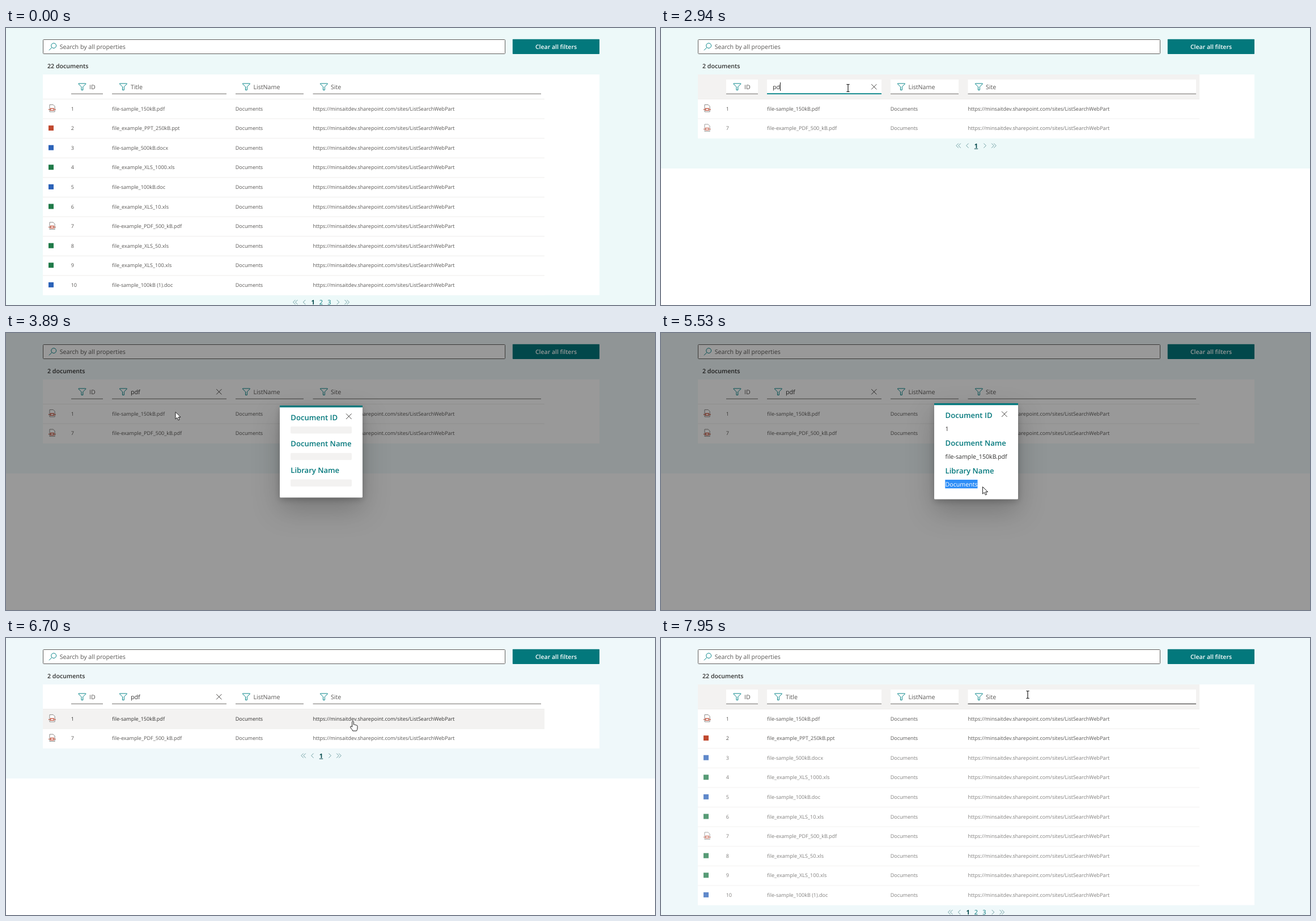
Write an HTML page that moves like this. It is 1145 px wide and 489 px high and loops after 8000 ms.

```html
<!DOCTYPE html>
<html lang="en">
<head>
<meta charset="utf-8">
<title>Document search</title>
<style>
  html, body { margin: 0; width: 100%; height: 100%; overflow: hidden; background: #fff; }
  svg { display: block; width: 1145px; height: 489px; }
  text {
    font: 10.65px "Open Sans", "Noto Sans", sans-serif;
    fill: #585654;
    text-rendering: geometricPrecision;
    white-space: pre;
  }
  .row text { font-size: 9.05px; }
  .row.hover text { fill: #323130; }
  .bold { font-weight: 600; fill: #323130; }
  .head { font-size: 13.1px; font-weight: 600; fill: #03787c; }
  .val { fill: #323130; }
  .line { fill: none; stroke: #038387; stroke-width: 1; }
  .cross { fill: none; stroke: #484644; stroke-width: 1; }
  .rule { fill: #7a7876; }
  .field { fill: #fff; }
  .pages text { font-size: 11px; fill: #03787c; text-anchor: middle; }
  .pages .now { font-weight: 700; fill: #02474a; }
  .pages path { fill: none; stroke: #6f9fa3; stroke-width: 1; }
  #modal { filter: drop-shadow(0 4px 6px rgba(0,0,0,.2)) drop-shadow(0 20px 24px rgba(0,0,0,.22)); }
  #cursor path { stroke-linejoin: round; }
</style>
</head>
<body>
<svg id="stage" viewBox="0 0 1145 489" xmlns="http://www.w3.org/2000/svg">
  <rect id="bg" width="1145" height="489"/>
  <rect x="65.5" y="20.5" width="815" height="25" rx="1" fill="#fff" stroke="#605e5c"/>
  <path class="line" d="M80.9 34.4L75.9 39.4"/><circle class="line" cx="84.2" cy="31.2" r="4.4"/>
  <text x="94.7" y="37">Search by all properties</text>
  <rect id="clear" x="893.8" y="19.8" width="153.2" height="26.2" rx=".8"/>
  <text x="970.5" y="37" text-anchor="middle" style="font-weight:600;font-size:10.5px;fill:#fff">Clear all filters</text>
  <text id="count" class="bold" x="73" y="71"></text>
  <rect id="panel" x="65" y="82" width="982" fill="#fff"/>
  <rect id="header" x="65" y="82" width="885" height="43.5" fill="#f3f2f1"/>
  <g id="fields"></g>
  <g id="rows"></g>
  <g id="pages" class="pages"></g>
  <rect id="shade" width="1145" height="489" fill="#000"/>
  <g id="modal"></g>
  <g id="cursor">
    <path id="arrow" d="M.5 .5V13L3.4 10.3L5.4 14.9L7.6 14L5.6 9.5H9.6Z" fill="#fff" stroke="#222"/>
    <path id="beam" d="M-2.7-6.5H-.8L0-5.8L.8-6.5H2.7M0-5.8V5.8M-2.7 6.5H-.8L0 5.8L.8 6.5H2.7" fill="none" stroke="#222" stroke-width="1.2"/>
    <path id="hand" d="M-1.3 10V.8Q0-1.2 1.3 .8V6Q2.8 5 3.8 6.5Q5.3 5.7 6 7.2Q7.8 6.6 8 8.5V12Q8 14.5 6.5 17H-.3Q-1 14.5-3.6 12Q-5 9.8-4 9Q-2.8 8.4-1.3 10Z" fill="#fff" stroke="#222"/>
  </g>
</svg>
<script>
const LOOP = 8000, STEP = 34.6, TOP = 125.5;
const $ = id => document.getElementById(id);
const set = (el, attrs) => { for (const k in attrs) el.setAttribute(k, attrs[k]); };
const show = (el, on) => { el.style.display = on ? '' : 'none'; };
const clamp = v => Math.max(0, Math.min(1, v));
const inside = (p, x1, y1, x2, y2) => p.x >= x1 && p.x < x2 && p.y >= y1 && p.y < y2;

const text = (x, y, s, cls = '', id = '') => `<text x="${x}" y="${y}" class="${cls}" id="${id}">${s}</text>`;
const cross = (x, y, r) => `<path class="cross" d="M${x - r} ${y - r}l${2 * r} ${2 * r}m0 ${-2 * r}l${-2 * r} ${2 * r}"/>`;
const funnel = x => `<path class="line" d="M${x} 98h12.8v.8l-5 5v5.7h-2.8v-5.7l-5-5z"/>`;

// Column filters: left, right, icon x, label x, label
const columns = [
  [115, 171, 128, 147, 'ID'],
  [187, 389, 200.5, 220, 'Title'],
  [405, 525, 417.5, 436.5, 'ListName'],
  [541.5, 944, 554.5, 573, 'Site']
];
$('fields').innerHTML = columns.map(([l, r, ix, tx, name], i) =>
  `<rect class="field" x="${l}" y="91" width="${r - l}" height="25"/>
   <rect class="rule" id="rule${i}" x="${l}" y="115.7" width="${r - l}" height="1.1"/>
   <g id="funnel${i}">${funnel(ix)}</g>${text(tx, 108, name, '', 'label' + i)}`).join('') +
  `<g id="wipe">${cross(375.8, 103.8, 4.6)}</g>
   <rect id="caret" y="96" width="1" height="15" fill="#222"/>`;

const files = [
  'file-sample_150kB.pdf', 'file_example_PPT_250kB.ppt', 'file-sample_500kB.docx',
  'file_example_XLS_1000.xls', 'file-sample_100kB.doc', 'file_example_XLS_10.xls',
  'file-example_PDF_500_kB.pdf', 'file_example_XLS_50.xls', 'file_example_XLS_100.xls',
  'file-sample_100kB (1).doc'
];
const tints = { ppt: '#c0492f', doc: '#2b62b8', docx: '#2b62b8', xls: '#1f7a48' };
const sheet = `<path d="M77 9.9h6.2l2.9 2.9v9.6h-9.1z" fill="#fff" stroke="#8a8886"/>
  <path d="M75 18.4h2.2m8.4 0h2.2M78.6 16.6h5.6v3.4h-5.6z" fill="none" stroke="#c2472f" stroke-width="1.2"/>`;
const icon = ext => ext === 'pdf' ? sheet :
  `<rect x="75" y="12" width="9" height="9" fill="${tints[ext]}"/>`;
const link = 'https://minsaitdev.sharepoint.com/sites/ListSearchWebPart';

$('rows').innerHTML = files.map((name, i) =>
  `<g class="row"><rect class="fill" x="65" width="885" height="${STEP}" fill="#fff"/>
   <rect x="65" y="-.5" width="885" height="1" fill="#eeedec"/>
   ${icon(name.split('.').pop())}
   ${text(114.7, 20.2, i + 1)}${text(187.3, 20.2, name)}${text(404.7, 20.2, 'Documents')}${text(541.5, 20.2, link)}</g>`).join('');
const rows = [...document.querySelectorAll('.row')];

const chevron = (x, y, dir) => `<path d="M${x + 2 * dir} ${y - 4}L${x - 2 * dir} ${y}L${x + 2 * dir} ${y + 4}"/>`;
function pager(n, y) {
  const half = 14.3 * (n - 1) / 2;
  let out = '';
  for (const dir of [1, -1]) {
    const at = d => 556 - dir * (half + d);
    out += chevron(at(15.4), y, dir) + chevron(at(29.2), y, dir) + chevron(at(33.2), y, dir);
  }
  for (let i = 0; i < n; i++)
    out += text(556 - half + 14.3 * i, y + 4, i + 1, i ? '' : 'now');
  if (n === 1) out += `<rect x="552.8" y="${y + 5}" width="6.4" height="1" fill="#02474a"/>`;
  return out;
}

const heads = ['Document ID', 'Document Name', 'Library Name'];
const card = (x, y, w, h, inner) =>
  `<rect x="${x}" y="${y}" width="${w}" height="${h}" rx="1.5" fill="#fff"/>
   <rect x="${x}" y="${y}" width="${w}" height="3.3" fill="#03787c"/>${inner}`;
$('modal').innerHTML =
  `<g id="loading">${card(483, 128, 146, 162.5, cross(604.8, 147.2, 4.8) + heads.map((h, i) =>
    text(502.3, 153.6 + 46.6 * i, h, 'head') +
    `<rect x="502" y="${165 + 46.7 * i}" width="108" height="12.6" rx="2" fill="#f3f2f1"/>`).join(''))}</g>
   <g id="loaded">${card(482, 124, 148, 169.5, cross(605.8, 143.2, 4.8) + heads.map((h, i) =>
    text(501.6, 149.6 + 49 * i, h, 'head') +
    text(501.6, 173 + 49 * i, ['1', files[0], 'Documents'][i], 'val')).join(''))}
   <clipPath id="cut"><rect id="picked" x="501.3" y="259" height="15.5"/></clipPath>
   <g clip-path="url(#cut)"><rect x="501" y="259" width="58" height="15.5" fill="#2e8ef7"/>
   <text x="501.6" y="271" style="fill:#fff">Documents</text></g></g>`;

// Pointer moves: start, end, steps, x, y
const moves = [
  [1010, 1480, 7, 330, 106],
  [3320, 3570, 4, 298.5, 139],
  [4120, 4270, 3, 476, 290],
  [4440, 4590, 3, 503, 264],
  [4670, 4820, 3, 490, 270],
  [4990, 5455, 7, 567, 271],
  [5600, 5770, 3, 600, 166],
  [5850, 6240, 6, 612, 147],
  [6780, 7410, 9, 960, 36],
  [7640, 7950, 5, 647, 100]
];
function pointer(t) {
  const p = { x: 608, y: -20 };
  for (const [a, b, n, x, y] of moves) {
    if (t < a) break;
    const u = Math.min(1, (Math.floor((t - a) / (b - a) * (n - 1) + 1e-6) + 1) / n);
    const e = u * u * (3 - 2 * u);
    p.x += (x - p.x) * e;
    p.y += (y - p.y) * e;
  }
  return p;
}

// Latest value in a list of [time, value]
const at = (t, list) => list.reduce((v, [time, next]) => t >= time ? next : v, null);
const typed = [[0, ''], [2550, 'p'], [2780, 'pd'], [3010, 'pdf'], [7720, '']];
const total = [[0, 22], [2550, 18], [2780, 2], [7720, 22]];
let pageKey = '';

function drawField(t, value) {
  const focus = t < 3000 ? clamp((t - 1490) / 200) : 1 - clamp((t - 3717) / 150);
  const x = 220 - 23 * focus, label = $('label1');
  label.textContent = value || 'Title';
  label.setAttribute('class', value ? 'val' : '');
  set(label, { x });
  set($('funnel1'), { transform: `translate(${-11 * focus} 0)`, opacity: 1 - focus });
  show($('wipe'), value);
  show($('caret'), (t >= 1490 && t < 2020) || (t >= 2550 && t < 3540));
  set($('caret'), { x: Math.round(value ? x + label.getComputedTextLength() : 197) });
}

// Underlines: teal and thicker when focused, darker when hovered
function drawRules(t, p, open) {
  columns.forEach(([l, r], i) => {
    const focused = i === 1 && t >= 1490 && t < 3717;
    const hovered = !open && inside(p, l, 91, r, 117);
    set($('rule' + i), { height: focused ? 1.8 : 1.1, y: focused ? 115.2 : 115.7 });
    $('rule' + i).style.fill = focused ? '#038387' : hovered ? '#323130' : '';
  });
}

function drawRows(t, few, hoverRow) {
  rows.forEach((row, i) => {
    const slot = few && i === 6 ? 1 : i;
    show(row, !few || i === 0 || i === 6);
    let fade = 1;
    if (few && i === 6) fade = clamp(.4 + (t - 2780) / 400);
    if (t >= 7720 && i > 1) fade = clamp((t - 7720) / 310);
    set(row, { transform: `translate(0 ${TOP + slot * STEP})`, opacity: fade });
    row.classList.toggle('hover', slot === hoverRow);
    set(row.firstChild, { fill: slot === hoverRow ? '#f3f2f1' : '#fff' });
  });
}

function drawPointer(t, p, open) {
  const onField = columns.some(([l, r]) => inside(p, l, 91, r, 117));
  const onButton = inside(p, 894, 20, 1047, 46);
  const onClose = inside(p, 594, 132, 618, 155);
  let kind = 'arrow';
  if (open ? onClose : onButton || (t >= 6620 && t < 6780)) kind = 'hand';
  else if (!open && onField) kind = 'beam';
  for (const k of ['arrow', 'beam', 'hand']) show($(k), k === kind);
  set($('cursor'), { transform: `translate(${p.x} ${p.y})` });
  set($('clear'), { fill: !open && onButton ? '#026c70' : '#03787c' });
}

function draw(t) {
  const p = pointer(t), value = at(t, typed), count = at(t, total), few = count === 2;
  const open = t >= 3885 && t < 6620;
  const closing = t >= 6620 && t < 6695;

  set($('bg'), { height: few ? 248 : 489, fill: t < 3885 ? '#edf9f9' : '#eff8fa' });
  set($('panel'), { height: few ? 113 : 389.5 });
  $('count').textContent = count + ' documents';
  show($('header'), !open && inside(p, 65, 82, 950, TOP));
  drawField(t, value);
  drawRules(t, p, open);

  const onRows = !open && inside(p, 65, TOP, 950, TOP + (few ? 2 : 10) * STEP);
  drawRows(t, few, onRows ? Math.floor((p.y - TOP) / STEP) : -1);

  const n = Math.ceil(count / 10), y = few ? 207.7 : 484;
  if (pageKey !== n + '/' + y) {
    pageKey = n + '/' + y;
    $('pages').innerHTML = pager(n, y);
  }

  show($('shade'), open || closing);
  show($('modal'), open || closing);
  set($('shade'), { opacity: closing ? .14 : .4 });
  set($('modal'), { opacity: closing ? .35 : 1 });
  show($('loading'), t < 3965);
  show($('loaded'), t >= 3965);
  set($('picked'), { width: t < 4990 ? 0 : t < 5455 ? Math.max(0, Math.min(57.2, p.x - 501.3)) : 57.2 });
  drawPointer(t, p, open);
}

const began = performance.now();
function tick() {
  draw((performance.now() - began) % LOOP);
  requestAnimationFrame(tick);
}
tick();
</script>
</body>
</html>
```
